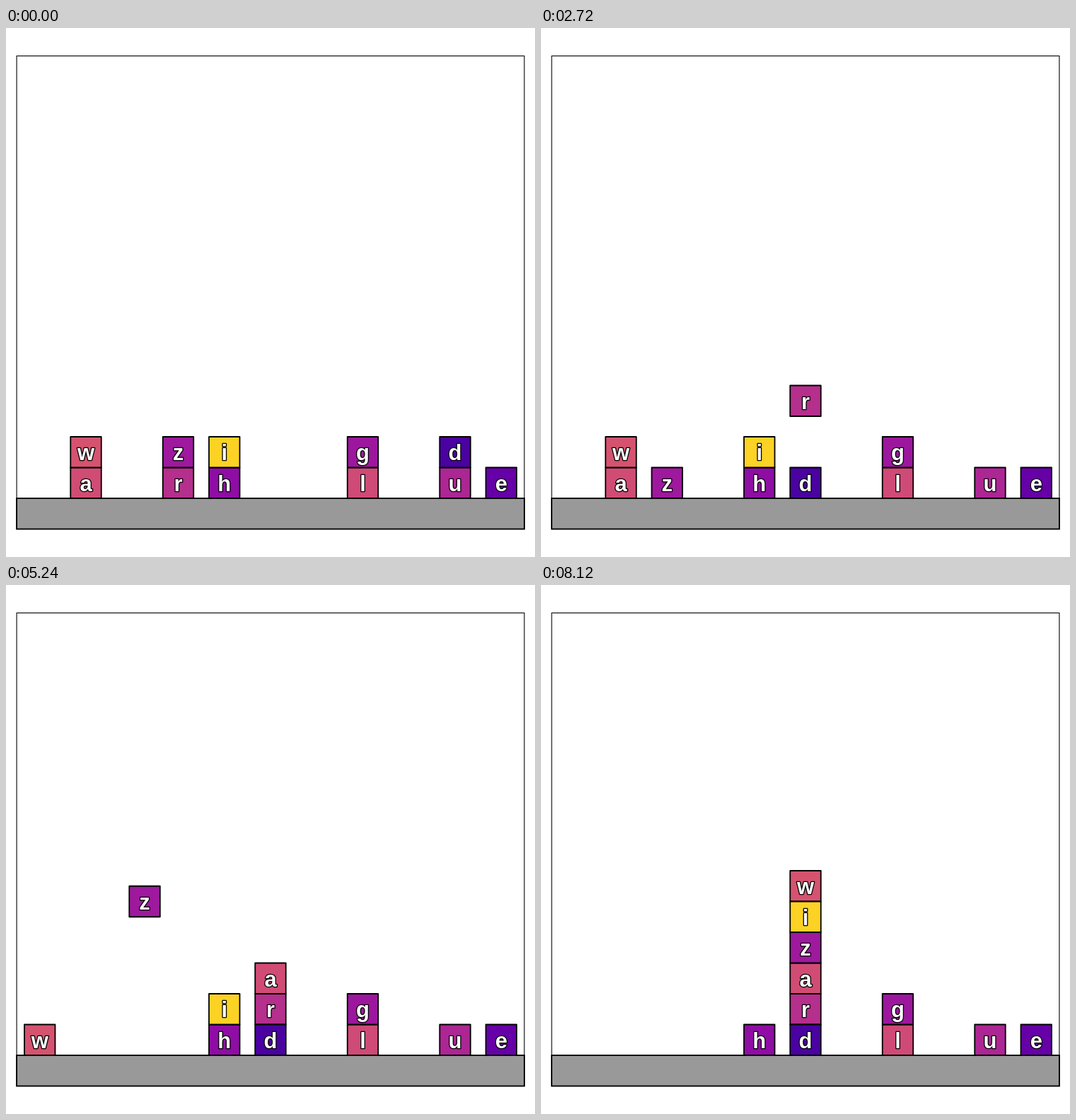
An HTML page with a canvas that plays this animation: 748x748 px, repeating every 8.16 s.

```html
<!DOCTYPE html>
<html>
<head>
<meta charset="utf-8">
<style>
html, body { margin: 0; width: 100%; height: 100%; overflow: hidden; background: #fff; }
canvas { display: block; }
</style>
</head>
<body>
<canvas id="stage" width="748" height="748"></canvas>
<script>
const ctx = document.getElementById('stage').getContext('2d');
const SIZE = 43.5, GAP = 1.5, FLOOR = 665, SPEED = 0.4, STEP = 40, STEPS = 204;
const LEFT = 15.1, TOP = 39.5, WIDTH = 717.8, HEIGHT = 669;
const colors = {
  w: '#d5536f', a: '#d04c74', z: '#9e199d', r: '#b52f8c', i: '#fcd225', h: '#8f0da4',
  g: '#9c179e', l: '#cf4a77', d: '#4a02a0', u: '#ac2694', e: '#6600a7'
};
// Stacks from bottom to top, and [from, to] column moves
const start = ['', 'aw', '', 'rz', 'hi', '', '', 'lg', '', 'ud', 'e'];
const moves = [[9, 5], [3, 2], [3, 5], [1, 0], [1, 5], [2, 5], [4, 5], [0, 5]];

// Each leg is a straight run at constant speed, rounded to whole steps
const legs = [];
const stacks = start.slice();
let clock = 0;
for (const [from, to] of moves) {
  const carry = Math.max(...stacks.map(s => s.length)) + 1.5;
  const name = stacks[from].slice(-1);
  stacks[from] = stacks[from].slice(0, -1);
  const path = [
    [from * GAP, stacks[from].length], [from * GAP, carry],
    [to * GAP, carry], [to * GAP, stacks[to].length]
  ];
  for (let k = 0; k < 3; k++) {
    const [p, q] = [path[k], path[k + 1]];
    const length = Math.abs(q[0] - p[0]) + Math.abs(q[1] - p[1]);
    const steps = Math.round(length / SPEED);
    legs.push({ name, p, q, begin: clock, steps });
    clock += steps;
  }
  stacks[to] += name;
}

function pose(step) {
  const at = {};
  start.forEach((s, col) => [...s].forEach((name, level) => at[name] = [col * GAP, level]));
  for (const { name, p, q, begin, steps } of legs) {
    if (step < begin) break;
    const f = Math.min(1, (step - begin) / steps);
    at[name] = p.map((v, k) => v + (q[k] - v) * f);
  }
  return at;
}

function drawBlock(name, [col, level]) {
  const x = 374 + (col - 5 * GAP) * SIZE;
  const y = FLOOR - (level + 0.5) * SIZE;
  ctx.fillStyle = colors[name];
  ctx.lineWidth = 1.8;
  ctx.beginPath();
  ctx.rect(x - SIZE / 2, y - SIZE / 2, SIZE, SIZE);
  ctx.fill();
  ctx.stroke();
  ctx.lineWidth = 2.6;
  ctx.strokeText(name, x, y + 11.5);
  ctx.fillStyle = '#fff';
  ctx.fillText(name, x, y + 11.5);
}

function draw(step) {
  ctx.fillStyle = '#fff';
  ctx.fillRect(0, 0, 748, 748);
  ctx.strokeStyle = '#000';
  ctx.lineJoin = 'miter';
  ctx.fillStyle = '#999';
  ctx.lineWidth = 1.8;
  ctx.fillRect(LEFT, FLOOR, WIDTH, SIZE);
  ctx.strokeRect(LEFT, FLOOR, WIDTH, SIZE);
  ctx.lineWidth = 1.1;
  ctx.strokeRect(LEFT, TOP, WIDTH, HEIGHT);
  ctx.lineJoin = 'round';
  ctx.font = 'bold 31px "Liberation Sans", Arial, sans-serif';
  ctx.textAlign = 'center';
  for (const [name, place] of Object.entries(pose(step))) drawBlock(name, place);
}

const origin = performance.now();
function tick() {
  draw(Math.floor((performance.now() - origin) / STEP) % STEPS);
  requestAnimationFrame(tick);
}
tick();
</script>
</body>
</html>
```
